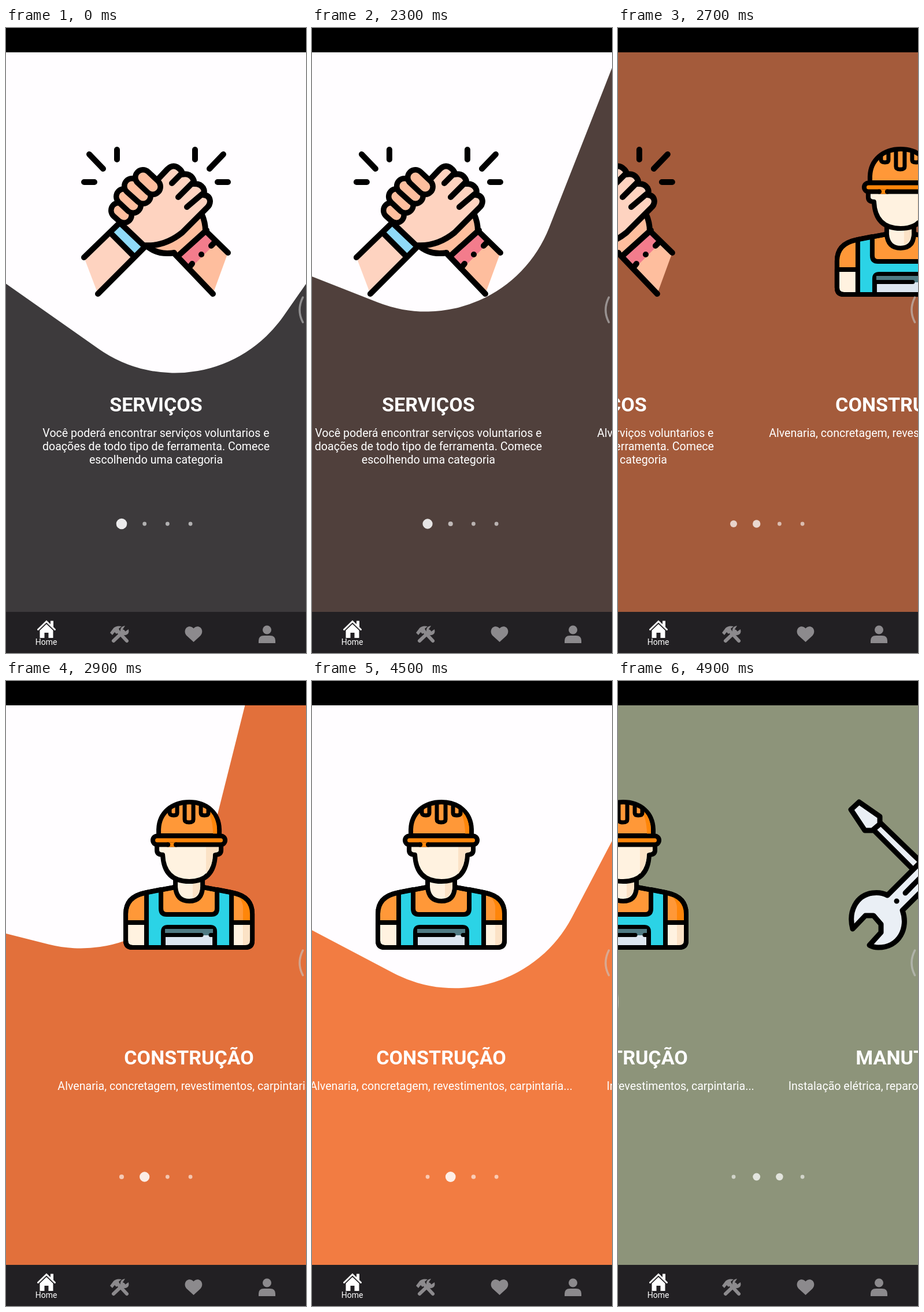
These frames come from a looping animation (519 by 1079 pixels, 5 s). An HTML page:

```html
<!DOCTYPE html>
<html lang="pt">
<head>
<meta charset="utf-8">
<style>
  html, body { margin: 0; width: 100%; height: 100%; overflow: hidden; background: #000; }
  svg { display: block; width: 100%; height: 100%; overflow: hidden; }
  text { font-family: Roboto, sans-serif; fill: #fff; text-anchor: middle; }
  .title { font-size: 34.1px; font-weight: 700; }
  .body { font-size: 19.6px; }
  .ink { stroke: #000; stroke-linecap: round; stroke-linejoin: round; fill: none; }
  .nav { fill: #8c8a8d; stroke: #8c8a8d; stroke-width: 0; }
</style>
</head>
<body>
<svg viewBox="0 0 519 1079">
  <rect id="bg" width="519" height="1079"/>
  <rect id="square" x="-539.5" y="-539.5" width="1079" height="1079" rx="229" fill="#fffdff"/>

  <g class="page">
    <g class="ink" stroke-width="10">
      <path d="M192 210V227M327 210V227M144 218L168 243M376 218L352 243M135 266H153M366 266H384"/>
      <!-- right arm -->
      <path d="M290 388L341 326 345 350 384 388 358 459Z" fill="#febe9e" stroke="none"/>
      <path d="M296 394L346 349 365 369 320 414Z" fill="#f37c8c" stroke="none"/>
      <path d="M242 375Q262 393 291 389L345 349Q345 336 339 322" fill="#febe9e" stroke="none"/>
      <path d="M242 375Q262 393 291 388M339 322Q345 336 345 350L384 388M290 388L358 459M297 394L347 349M322 407L318 412M355 376L361 370M338 391h.1"/>
      <!-- left arm -->
      <path d="M135 396L198 338 240 376 159 459Z" fill="#fed3c0" stroke="none"/>
      <path d="M182 354L198 339 238 377 221 393Z" fill="#8fdaf8" stroke="none"/>
      <path d="M181 354L219 392M135 396L196 337M159 459L243 375"/>
      <path d="M262 262L279 244Q290 233 301 244Q306 249 304 253Q316 250 322 258Q327 265 324 269Q336 268 341 276Q345 283 340 288Q352 288 353 299Q353 306 347 311L305 353Q274 378 238 375L198 337Z" fill="#fed3c0"/>
      <path d="M303 252L287 268M323 267L298 292M339 287L313 309"/>
    </g>
    <g id="fingers" class="ink"></g>
    <text class="title" x="259.5" y="662">SERVIÇOS</text>
    <text class="body" x="259.5" y="706">Você poderá encontrar serviços voluntarios e</text>
    <text class="body" x="259.5" y="729">doações de todo tipo de ferramenta. Comece</text>
    <text class="body" x="259.5" y="752">escolhendo uma categoria</text>
  </g>

  <g class="page">
    <g class="ink" stroke-width="8">
      <!-- body -->
      <path d="M150 448V402Q150 373 182 366L235 356H284L337 366Q369 373 369 402V448Q369 460 357 460H162Q150 460 150 448Z" fill="#ff9838"/>
      <path d="M337 366Q369 373 369 402V417H353V390Q352 376 337 366Z" fill="#ff860a" stroke="none"/>
      <path d="M150 417H186V460H162Q150 460 150 448Z" fill="#fff2e0"/>
      <path d="M353 417H369V448Q369 460 357 460H353Z" fill="#fbe2c6" stroke="none"/>
      <path d="M333 417H353V460H333Z" fill="#fff2e0" stroke="none"/>
      <path d="M333 417H369"/>
      <path d="M186 365L211 360V393Q211 403 221 403H298Q308 403 308 393V360L333 365V460H186Z" fill="#2bd3e6"/>
      <path d="M215 460V433Q215 425 223 425H296Q304 425 304 433V460Z" fill="#dce6f0"/>
      <path d="M218 428H301V439H218Z" fill="#4f7a83" stroke="none"/>
      <path d="M218 438.500H281M297 438.500H301" stroke-width="7"/>
      <path d="M150 448V402Q150 373 182 366L235 356M284 356L337 366Q369 373 369 402V448Q369 460 357 460H162Q150 460 150 448"/>
      <!-- neck and face -->
      <path d="M236 335V356Q238 380 260 380Q282 380 283 356V335Z" fill="#fff2e0"/>
      <path d="M266 345H279V356Q278 369 266 375Z" fill="#fbe2c6" stroke="none"/>
      <path d="M204 282V292Q204 300 214 300Q216 346 260 346Q303 346 305 300Q315 300 315 292V282Z" fill="#fff2e0"/>
      <path d="M289 284H311V291Q311 296 301 297Q301 318 289 333Z" fill="#fbe2c6" stroke="none"/>
      <!-- helmet -->
      <path d="M207 267V258C207 227 231 209 260 209S312 227 312 258V267Z" fill="#ff9838"/>
      <path d="M296 225Q308 238 308 258V264H301Q301 240 292 224Z" fill="#ff860a" stroke="none"/>
      <path d="M252 210V239Q252 244 259.500 244Q267 244 267 239V210M226 219V228Q227 232 233 232Q239 232 239 228V214M280 214V228Q280 232 286 232Q293 232 293 228V219" stroke-width="7"/>
      <rect x="197" y="267.500" width="125" height="15" rx="7.500" fill="#ff860a"/>
      <path d="M224 282.500H236" stroke="#ff860a" stroke-linecap="butt"/>
      <path d="M223 282.500h.1M237 282.500h.1"/>
    </g>
    <text class="title" x="259.5" y="662">CONSTRUÇÃO</text>
    <text class="body" x="259.5" y="706">Alvenaria, concretagem, revestimentos, carpintaria...</text>
  </g>

  <g class="page">
    <g class="ink" stroke-width="9" transform="translate(-268)">
      <path d="M441 256L548 363 563 350 454 245Z" fill="#eaeff5"/>
      <path d="M417 209L453 234V247L440 258H427L403 222Z" fill="#eaeff5"/>
      <path d="M406 428C398 398 412 370 440 366Q455 364 466 370L560 276 586 302 492 396C503 426 487 460 450 460Q442 460 435 456L455 434V420L442 405H428Z" fill="#eaeff5"/>
      <path d="M482 380h.1M497 366L550 312"/>
    </g>
    <text class="title" x="259.5" y="662">MANUTENÇÃO</text>
    <text class="body" x="259.5" y="706">Instalação elétrica, reparos hidráulicos, vazamentos...</text>
  </g>

  <g id="dots" fill="#fff"></g>
  <path d="M513.500 465Q502.500 487 513.500 508" fill="none" stroke="#c8c8c8" stroke-opacity=".6" stroke-width="3.500" stroke-linecap="round"/>
  <rect width="519" height="42"/>

  <rect y="1008" width="519" height="71" fill="#222023"/>
  <g fill="#fff">
    <path d="M55.500 1038.500L70 1024.500 84.500 1038.500" fill="none" stroke="#fff" stroke-width="3" stroke-linecap="round"/>
    <path d="M77 1023.500H82V1035L77 1030ZM58.500 1040L70 1029 81.500 1040V1053H73.500V1044H66.500V1053H58.500Z"/>
    <text x="69.500" y="1065" font-size="14">Home</text>
  </g>
  <g class="nav">
    <path d="M180 1044L186 1036Q191 1031 200 1033L195 1037 197 1041 191 1046 188 1043 184 1048Z"/>
    <path d="M195 1043L209 1058M186 1058L203 1042" stroke-width="6" stroke-linecap="round" fill="none"/>
    <path d="M206 1032L202 1038 206 1042 212 1038Q214 1046 207 1048Q201 1049 198 1045Q196 1033 206 1032Z"/>
    <path d="M324.500 1060L313 1049.500C304 1040 315 1027 324.500 1036.500C334 1027 345 1040 336 1049.500Z"/>
    <circle cx="451.500" cy="1039" r="7.500"/>
    <path d="M437 1062V1058Q437 1049 446 1049H457Q466 1049 466 1058V1062Z"/>
  </g>
</svg>
<script>
const W = 519, SIZE = 1079, LOOP = 5000;
const $ = id => document.getElementById(id);
const pages = document.querySelectorAll('.page');
const colors = [[61, 58, 60], [255, 121, 59], [10, 179, 195]];

// [ms, scroll position in pages]
const keys = [[0, 0], [1900, 0], [2100, .015], [2200, .06], [2300, .112], [2600, .467], [2700, .559],
  [2800, .76], [2900, .89], [3000, .955], [3100, .988], [3200, 1], [3900, 1],
  [4000, 1.002], [4200, 1.003], [4400, 1.011], [4500, 1.0694], [4800, 1.427], [4900, 1.4836], [5000, 1.55]];

function scrollAt(t) {
  if (t <= 0) return 0;
  const i = keys.findIndex(k => k[0] >= t);
  const [t0, p0] = keys[i - 1], [t1, p1] = keys[i];
  return p0 + (p1 - p0) * (t - t0) / (t1 - t0);
}

function add(parent, tag, attrs) {
  const el = document.createElementNS('http://www.w3.org/2000/svg', tag);
  for (const k in attrs) el.setAttribute(k, attrs[k]);
  return parent.appendChild(el);
}

for (const d of ['M195 315L204 323', 'M204 291L220 306', 'M218 273L237 290', 'M237 258L254 274']) {
  add($('fingers'), 'path', { d, 'stroke-width': 36 });
  add($('fingers'), 'path', { d, 'stroke-width': 17, style: 'stroke:#febe9e' });
}

const dots = [0, 1, 2, 3].map(i => add($('dots'), 'circle', { cx: 200 + 39.7 * i, cy: 856 }));

function draw(t) {
  const pos = scrollAt(t);
  const late = scrollAt(t - 30); // the backdrop trails the swipe slightly
  const page = Math.floor(late), part = late - page;
  const swing = Math.min(part, 1 - part) * 2;

  const rgb = colors[page].map((c, i) => c + (colors[page + 1][i] - c) * part);
  $('bg').setAttribute('fill', `rgb(${rgb.map(Math.round)})`);
  $('square').setAttribute('transform',
    `translate(${.2 * SIZE} ${42 - .1 * SIZE}) rotate(${35 - 70 * swing}) translate(${-SIZE * swing})`);

  pages.forEach((el, i) => el.setAttribute('transform', `translate(${(i - pos) * W})`));
  dots.forEach((el, i) => {
    const near = Math.max(0, 1 - Math.abs(i - pos));
    el.setAttribute('r', 3.4 + 5.9 * near);
    el.setAttribute('opacity', .6 + .3 * near);
  });
}

const start = performance.now();
function tick() {
  const t = (performance.now() - start) % LOOP;
  draw(Math.floor(t / 100) * 100);
  requestAnimationFrame(tick);
}
tick();
</script>
</body>
</html>
```
